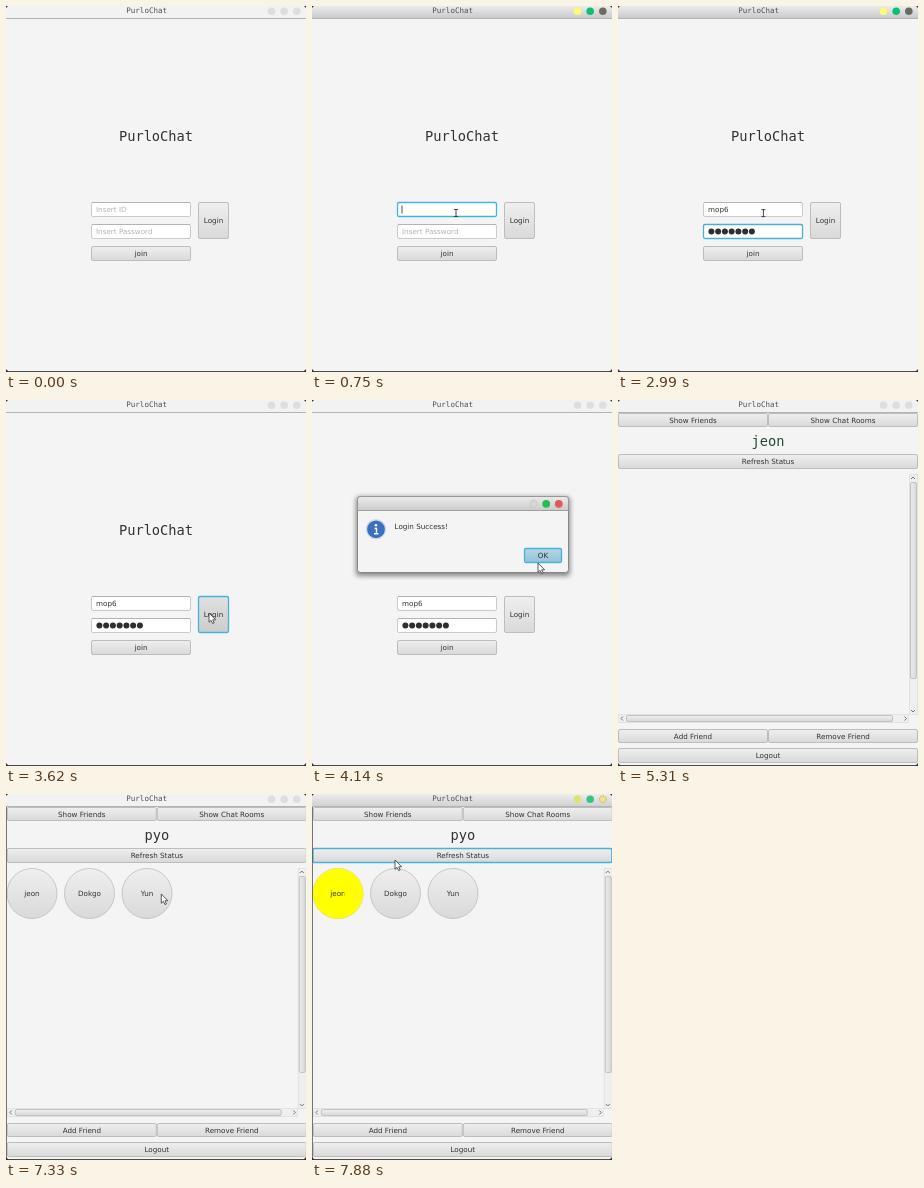
Recreate the animation shown at these times as an HTML page. Size 300 by 366 pixels, loop 8000 ms.

```html
<!DOCTYPE html>
<html lang="en">
<head>
<meta charset="utf-8">
<title>PurloChat</title>
<style>
  html, body { margin: 0; width: 300px; height: 366px; overflow: hidden; background: #f4f4f4; }
  svg { display: block; }
  text { font: 7.2px "DejaVu Sans", sans-serif; fill: #333; white-space: pre; }
  .mono { font-family: "DejaVu Sans Mono", monospace; font-size: 7.55px; }
  .big { font-family: "DejaVu Sans Mono", monospace; font-size: 13.7px; }
  .mid { text-anchor: middle; }
  .prompt { fill: #b3b3b3; }
</style>
</head>
<body>
<svg id="stage" width="300" height="366" viewBox="0 0 300 366">
  <defs>
    <linearGradient id="face" x2="0" y2="1"><stop stop-color="#efefef"/><stop offset="1" stop-color="#d9d9d9"/></linearGradient>
    <linearGradient id="thumb" x2="1" y2="0"><stop stop-color="#ececec"/><stop offset="1" stop-color="#d8d8d8"/></linearGradient>
    <linearGradient id="bar" x2="0" y2="1"><stop stop-color="#ebebeb"/><stop offset="1" stop-color="#cbcbce"/></linearGradient>
    <linearGradient id="blue" x2="0" y2="1"><stop stop-color="#b4d6e6"/><stop offset="1" stop-color="#94c2d8"/></linearGradient>
    <filter id="soft" x="-10%" y="-20%" width="120%" height="150%"><feGaussianBlur stdDeviation="2.5"/></filter>
  </defs>
</svg>
<script>
const LOOP = 8000;
const APP = 'PurloChat', USER = 'mop6';
const stage = document.getElementById('stage');

function add(parent, tag, attrs, text) {
  const node = document.createElementNS('http://www.w3.org/2000/svg', tag);
  for (const key in attrs) node.setAttribute(key, attrs[key]);
  if (text) node.textContent = text;
  parent.append(node);
  return node;
}
const group = (parent = stage) => add(parent, 'g', {});
const label = (p, x, y, text, cls = 'mid') => add(p, 'text', { x, y, class: cls }, text);
const dot = (p, cx, cy, r, fill, more) => add(p, 'circle', { cx, cy, r, fill, ...more });
const line = (p, d, stroke, width = 1) =>
  add(p, 'path', { d, stroke, 'stroke-width': width, fill: 'none' });
const box = (p, x, y, width, height, fill, stroke = 'none', rx = 1.5) =>
  add(p, 'rect', { x: x + .5, y: y + .5, width: width - 1, height: height - 1, rx, fill, stroke });
const ring = (p, x, y, w, h) => {
  const node = box(p, x, y, w, h, 'none', '#45b2d6');
  node.setAttribute('stroke-width', 1.3);
  return node;
};
const show = (node, on) => node.setAttribute('visibility', on ? 'inherit' : 'hidden');
const between = (t, a, b) => t >= a && t < b;

function button(p, x, y, w, h, text, fill = 'url(#face)') {
  box(p, x, y, w, h, fill, '#bdbdbd');
  label(p, x + w / 2, y + h / 2 + 2.6, text);
}

// Login screen
const login = group();
label(login, 150, 134.5, APP, 'big mid');
for (const y of [196, 218]) {
  box(login, 85, y, 100, 15, '#fff', '#cbcbcb');
  line(login, `M86 ${y + .5}H184`, '#b4b4b4');
}
button(login, 85, 240, 100, 15, 'join');
button(login, 192, 196, 31, 37, 'Login');
const pressed = box(login, 192, 196, 31, 37, 'rgba(0,0,0,.06)');
const idPrompt = label(login, 90, 206.2, 'Insert ID', 'prompt');
const pwPrompt = label(login, 90, 228.2, 'Insert Password', 'prompt');
const idText = label(login, 90, 206.2, '', '');
const secret = Array.from({ length: 7 }, (_, i) => dot(login, 93.4 + i * 6.75, 225.5, 3, '#2e2e2e'));
const caret = line(login, 'M0 -4V4', '#222', .8);
const idRing = ring(login, 85, 196, 100, 15);
const pwRing = ring(login, 85, 218, 100, 15);
const loginRing = ring(login, 192, 196, 31, 37);

// Friends screens
function friendsScreen(name, color, friends, shift) {
  const g = group();
  g.setAttribute('transform', `translate(${shift} 0)`);
  button(g, 0, 13, 150, 14, 'Show Friends');
  button(g, 150, 13, 150, 14, 'Show Chat Rooms');
  label(g, 150, 45.7, name, 'big mid').style.fill = color;
  button(g, 0, 54, 300, 15, 'Refresh Status');
  box(g, 291, 74, 9, 241, '#efefef', '#e2e2e2', 0);
  box(g, 0, 314, 291, 9, '#efefef', '#e2e2e2', 0);
  box(g, 292, 82, 7, 197, 'url(#thumb)', '#c2c2c2');
  box(g, 8, 315, 267, 7, 'url(#face)', '#c2c2c2');
  line(g, 'M293 79l2-2 2 2M293 310l2 2 2-2M5 316.500l-2 2 2 2M286.500 316.500l2 2-2 2', '#666', .9);
  button(g, 0, 329, 150, 14, 'Add Friend');
  button(g, 150, 329, 150, 14, 'Remove Friend');
  button(g, 0, 348, 300, 15, 'Logout');
  friends.forEach((friend, i) => {
    const x = 25.2 + i * 57.5;
    dot(g, x, 99.5, 25, 'url(#face)', { stroke: '#bdbdbd', 'stroke-width': .8 });
    label(g, x, 102.2, friend);
  });
  return g;
}
const first = friendsScreen('jeon', '#254a34', [], 0);
const second = friendsScreen('pyo', '#333', ['jeon', 'Dokgo', 'Yun'], .8);
const refreshRing = ring(second, -.5, 54, 300, 15);
const online = group(second);
dot(online, 25.2, 99.5, 25.2, '#ff0');
const clip = add(stage.querySelector('defs'), 'clipPath', { id: 'cut' });
add(clip, 'rect', { x: 0, y: 90, width: 31.5, height: 20 });
label(online, 25.2, 102.2, 'jeon').setAttribute('clip-path', 'url(#cut)');
line(second, 'M-.4 12V366', '#555', .9);

// Window frame
const frame = group();
box(frame, -1, -1, 302, 13, '#f2f2f2', 'none', 0);
const lit = group(frame);
add(lit, 'rect', { width: 300, height: 12, fill: 'url(#bar)' });
line(frame, 'M0 12.500H300', '#b3b3b3');
label(frame, 140.7, 7.2, APP, 'mono mid').style.fill = '#505050';
for (const x of [265.5, 278.2, 290.8]) dot(frame, x, 5.3, 3.8, '#dedede');
const lamps = group(frame);
const lampA = dot(lamps, 265.5, 5.3, 3.8, '');
dot(lamps, 278.2, 5.3, 3.8, '#0dbf73');
const lampC = dot(lamps, 290.8, 5.3, 3.8, '');
const dashes = dot(lamps, 290.8, 5.3, 3.4, 'none', { stroke: '#8c8a4a', 'stroke-width': .8, 'stroke-dasharray': '1.3 1.3' });
line(frame, 'M0 365.500H300', '#4a4a4a');
add(frame, 'path', { d: 'M0 0h2l-2 2zM300 0h-2l2 2zM0 366v-3l3 3zM300 366v-3l-3 3z', fill: '#333' });

// Message box
const dialog = group();
add(dialog, 'rect', { x: 44, y: 97, width: 214, height: 79, rx: 3, fill: '#000', opacity: .45, filter: 'url(#soft)' });
box(dialog, 45, 96, 212, 77, '#f4f4f4', '#868686', 3);
add(dialog, 'path', { d: 'M45.500 110.500V99.500q0-3 3-3H253.500q3 0 3 3V110.500z', fill: 'url(#bar)', stroke: '#8e8e8e', 'stroke-width': .8 });
dot(dialog, 221.7, 103.8, 3.6, '#d6d6d6', { stroke: '#c2c2c2', 'stroke-width': .6 });
dot(dialog, 234.2, 103.8, 3.9, '#25bd50');
dot(dialog, 246.8, 103.8, 3.9, '#e05858');
dot(dialog, 64, 129.3, 9.6, '#3b6fc0', { stroke: '#d3dcea', 'stroke-width': 1.4 });
dot(dialog, 64, 125.2, 1.3, '#fff');
line(dialog, 'M62.500 128.500H64.500V133.500M62 133.800H66.500', '#fff', 1.4);
label(dialog, 82.5, 128.7, 'Login Success!', '');
button(dialog, 212, 148, 38, 15, 'OK', 'url(#blue)');
ring(dialog, 212, 148, 38, 15);

// Pointers
const arrow = add(stage, 'path', { d: 'M0 0V9.300L2.100 7.400 3.700 10.600 5.200 9.900 3.700 6.800H6.600z', fill: '#fff', stroke: '#333', 'stroke-width': .8 });
const beam = line(stage, 'M-2-3.500H2M0-3.500V3.500M-2 3.500H2', '#333', .9);

// [time, x, y]
const route = [
  [30, 190, 368], [520, 144, 207], [2950, 144, 207], [3400, 203, 213], [3660, 203, 213],
  [4080, 226, 163], [4220, 226, 163], [4580, 234, 233], [4820, 235, 368],
  [6050, 40, 368], [6480, 66, 171], [6540, 66, 171], [6840, 21, 109],
  [7250, 166, 105], [7610, 83, 66]
];
// [time, level, fade length]
const focusLevels = [[0, 0, 1], [560, 1, 180], [3450, 0, 130], [4230, 1, 150], [5310, 0, 1], [7760, 1, 150]];

const clamp = v => Math.min(1, Math.max(0, v));
const ease = v => v * v * (3 - 2 * v);

function pointAt(t) {
  const i = route.findIndex(p => p[0] > t);
  if (i < 0) return route.at(-1).slice(1);
  if (i === 0) return route[0].slice(1);
  const [a, b] = [route[i - 1], route[i]];
  const k = ease((t - a[0]) / (b[0] - a[0]));
  return [a[1] + (b[1] - a[1]) * k, a[2] + (b[2] - a[2]) * k];
}

function activity(t) {
  return focusLevels.reduce((v, [at, to, len]) => v + (to - v) * clamp((t - at) / len), 0);
}

function draw(t) {
  const onLogin = t < 4400, onSecond = t >= 6050;
  show(login, onLogin);
  show(first, !onLogin && !onSecond);
  show(second, onSecond);

  const inId = between(t, 560, 1880), inPw = between(t, 2210, 3440);
  const typed = clamp((Math.floor((t - 1280) / 100) + 1) / 4) * 4;
  const hidden = Math.floor((t - 2300) / 95) + 1;
  idText.textContent = USER.slice(0, typed);
  show(idPrompt, !inId && !typed);
  show(pwPrompt, t < 2210);
  secret.forEach((d, i) => show(d, i < hidden));
  show(idRing, inId);
  show(pwRing, inPw);
  show(loginRing, between(t, 1880, 2210) || between(t, 3440, 3700) || between(t, 4230, 4400));
  show(pressed, between(t, 3440, 3660));
  show(caret, inId && !between(t, 1180, 1280) || inPw && t < 2950);
  const caretX = inId ? 90 + (typed ? idText.getComputedTextLength() : 0)
                      : 90 + Math.min(7, Math.max(0, hidden)) * 6.75;
  caret.setAttribute('transform', `translate(${caretX} ${inId ? 203.5 : 225.5})`);

  show(refreshRing, t >= 7790);
  show(online, t >= 7880);

  const level = activity(t);
  lit.setAttribute('opacity', level);
  lamps.setAttribute('opacity', level);
  lampA.setAttribute('fill', onSecond ? '#e3e35c' : '#fdfb74');
  lampC.setAttribute('fill', onSecond ? '#eae77c' : '#6b6b5e');
  show(dashes, onSecond);

  show(dialog, between(t, 3660, 4230));
  dialog.setAttribute('opacity', clamp((t - 3640) / 140));

  const [x, y] = pointAt(t);
  const overField = onLogin && x > 85 && x < 185 && (between(y, 196, 211) || between(y, 218, 233));
  for (const p of [arrow, beam]) p.setAttribute('transform', `translate(${x} ${y})`);
  show(arrow, !overField);
  show(beam, overField);
}

const start = performance.now();
function tick() {
  draw((performance.now() - start) % LOOP);
  requestAnimationFrame(tick);
}
tick();
</script>
</body>
</html>
```
